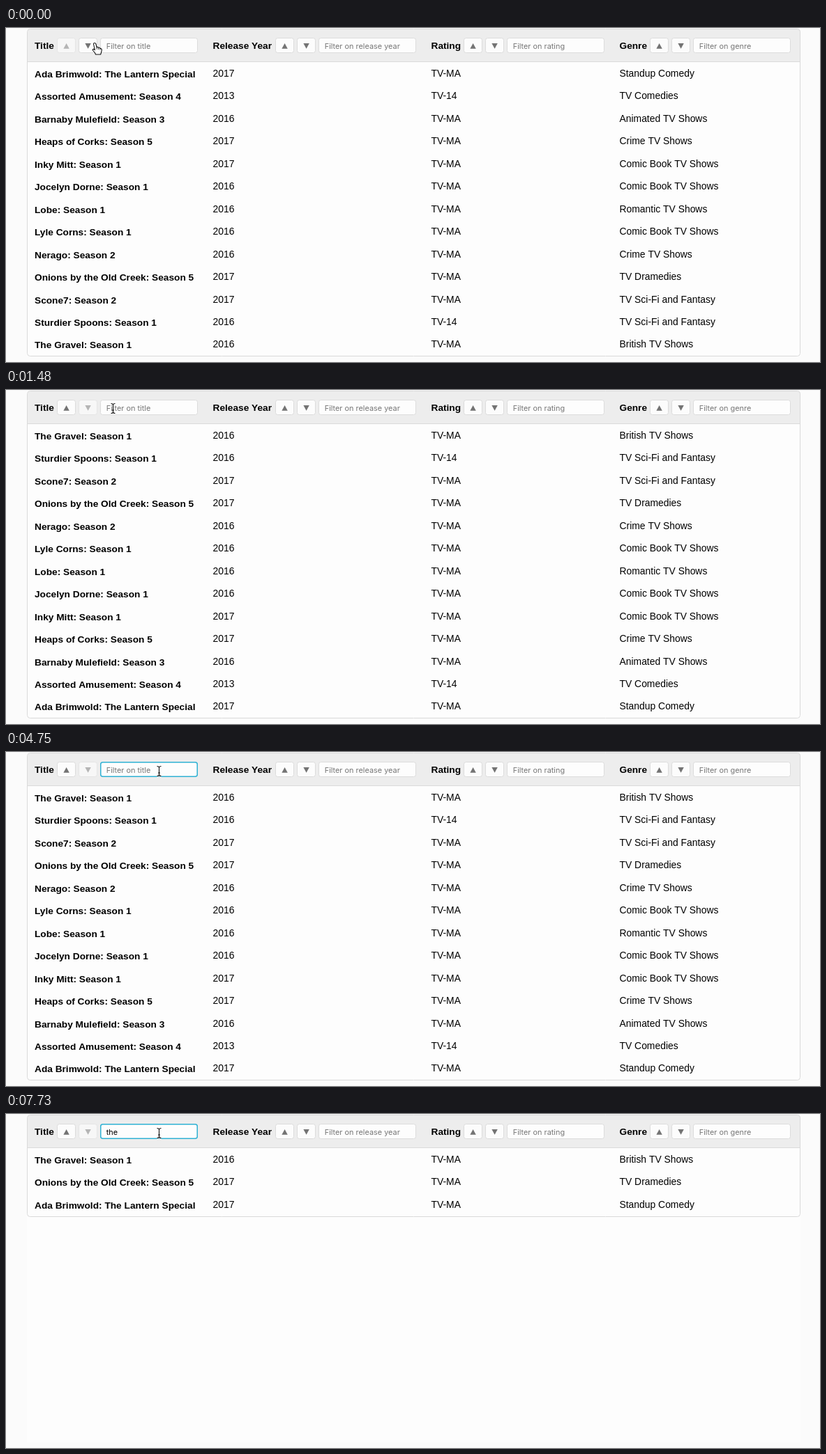
Write an HTML page with a canvas that moves like this. It is 1167 by 480 pixels and loops after 8 s.

```html
<!DOCTYPE html>
<html lang="en">
<head>
<meta charset="utf-8">
<title>Sortable, filterable table</title>
<style>
  html, body { margin: 0; width: 100%; height: 100%; overflow: hidden; background: #fbfbfb; }
  canvas { display: block; }
</style>
</head>
<body>
<canvas id="stage" width="1167" height="480"></canvas>
<script>
const ctx = document.getElementById('stage').getContext('2d');
const LOOP = 8000;
const PITCH = 32.45;
const SANS = '"Liberation Sans", Arial, sans-serif';
const BODY = `13.9px ${SANS}`;
const BOLD = `bold 13.7px ${SANS}`;
const FIELD = '10.9px Inter, Roboto, sans-serif';

const columns = [
  { label: 'Title', hint: 'Filter on title', x: 41, tools: 73 },
  { label: 'Release Year', hint: 'Filter on release year', x: 296.5, tools: 386 },
  { label: 'Rating', hint: 'Filter on rating', x: 609.5, tools: 656 },
  { label: 'Genre', hint: 'Filter on genre', x: 879.5, tools: 923 }
];

const shows = [
  ['Ada Brimwold: The Lantern Special', 2017, 'TV-MA', 'Standup Comedy'],
  ['Assorted Amusement: Season 4', 2013, 'TV-14', 'TV Comedies'],
  ['Barnaby Mulefield: Season 3', 2016, 'TV-MA', 'Animated TV Shows'],
  ['Heaps of Corks: Season 5', 2017, 'TV-MA', 'Crime TV Shows'],
  ['Inky Mitt: Season 1', 2017, 'TV-MA', 'Comic Book TV Shows'],
  ['Jocelyn Dorne: Season 1', 2016, 'TV-MA', 'Comic Book TV Shows'],
  ['Lobe: Season 1', 2016, 'TV-MA', 'Romantic TV Shows'],
  ['Lyle Corns: Season 1', 2016, 'TV-MA', 'Comic Book TV Shows'],
  ['Nerago: Season 2', 2016, 'TV-MA', 'Crime TV Shows'],
  ['Onions by the Old Creek: Season 5', 2017, 'TV-MA', 'TV Dramedies'],
  ['Scone7: Season 2', 2017, 'TV-MA', 'TV Sci-Fi and Fantasy'],
  ['Sturdier Spoons: Season 1', 2016, 'TV-14', 'TV Sci-Fi and Fantasy'],
  ['The Gravel: Season 1', 2016, 'TV-MA', 'British TV Shows']
];
const reversed = [...shows].reverse();

// Timelines: [start, value...]
const pointer = [
  [0, 'hand', 128, 22], [300, 'hand', 124, 23], [450, 'hand', 122, 23],
  [590, 'blocked', 122, 20], [1190, 'blocked', 123, 21], [1330, 'blocked', 122, 20.5],
  [1480, 'beam', 153.5, 26.5], [1620, 'beam', 154.5, 26.5],
  [2820, 'beam', 224.5, 27.5], [3110, 'beam', 219.5, 27.5]
];
const typed = [[0, ''], [5050, ' '], [5340, ''], [6990, 't'], [7130, 'the']];
const caret = [
  [0, false], [3260, true], [3700, false], [4150, true], [4750, false],
  [5050, true], [6090, false], [6540, true], [7730, false]
];
const at = (steps, t) => steps.findLast(s => s[0] <= t).slice(1);

function text(str, x, y, font, color = '#000') {
  ctx.font = font;
  ctx.fillStyle = color;
  ctx.fillText(str, x, y);
}

function box(x, y, w, h, r, fill, stroke, line = 1) {
  ctx.beginPath();
  ctx.roundRect(x + line / 2, y + line / 2, w - line, h - line, r);
  ctx.fillStyle = fill;
  ctx.fill();
  ctx.lineWidth = line;
  ctx.strokeStyle = stroke;
  ctx.stroke();
}

const buttonLooks = {
  normal: ['#fcfcfc', '#dcdcdc', '#737373'],
  waking: ['#fcfcfc', '#dcdcdc', '#929292'],
  disabled: ['#f7f7f7', '#e5e5e5', '#b5b5b5'],
  focus: ['#fcfcfc', '#4cb9d9', '#3f9fc4']
};

function sortButton(x, up, look) {
  const [fill, stroke, ink] = buttonLooks[look];
  box(x, 14, 27, 22, 3, fill, stroke);
  const cx = x + 13.6, base = up ? 29.7 : 22, tip = up ? 22 : 29.7;
  ctx.beginPath();
  ctx.moveTo(cx - 4.2, base);
  ctx.lineTo(cx + 4.2, base);
  ctx.lineTo(cx, tip);
  ctx.fillStyle = ink;
  ctx.fill();
}

function filterField(x, hint, value, focused, caretOn) {
  box(x, 14, 140, 22, 3, '#fdfdfd', focused ? '#2fb1d3' : '#dcdcdc', focused ? 1.5 : 1);
  text(value || hint, x + 8.7, 29.7, FIELD, value ? '#000' : '#777');
  if (!caretOn) return;
  ctx.fillStyle = '#000';
  ctx.fillRect(Math.round(x + 8.7 + (value ? ctx.measureText(value).width : 0)), 19, 1, 12);
}

const handShape = new Path2D('M-2.5 1Q-2.5-.5-1-.5Q.5-.5 .9 1L2 5.5Q3.6 4.8 4.4 6.2Q6 5.6 6.8 7.2Q9 7 9.3 9.5L8.6 13L7.6 16H.5L-.6 13.5L-3.6 10Q-4 8.2-2.2 8.3L-.6 9.6Z');
const handCreases = new Path2D('M2 5.5V8.5M4.4 6.2V9M6.8 7.2V9.5');
const arrowShape = new Path2D('M0 0V14L3.2 11L5.3 16L7.7 15L5.5 10.3H10Z');
const beamShape = new Path2D('M-3-7Q0-7 0-5Q0-7 3-7M0-5V5M-3 7Q0 7 0 5Q0 7 3 7M-1.5 2.5H1.5');

function outline(shape, color, width) {
  ctx.strokeStyle = color;
  ctx.lineWidth = width;
  ctx.stroke(shape);
}

const pointers = {
  hand() {
    ctx.fillStyle = '#fff';
    ctx.fill(handShape);
    outline(handShape, '#111', 1.1);
    outline(handCreases, '#111', 0.8);
  },
  blocked() {
    outline(arrowShape, '#fff', 1.8);
    ctx.fillStyle = '#000';
    ctx.fill(arrowShape);
    const sign = new Path2D();
    sign.arc(10, 21.5, 7, 0, Math.PI * 2);
    sign.moveTo(5.2, 16.7);
    sign.lineTo(14.8, 26.3);
    outline(sign, '#f4f4f4', 4);
    outline(sign, '#a2a2a2', 2);
  },
  beam() {
    outline(beamShape, '#fff', 2.4);
    outline(beamShape, '#111', 1.1);
  }
};

function drawPointer(kind, x, y) {
  ctx.save();
  ctx.translate(x, y);
  ctx.lineJoin = 'round';
  pointers[kind]();
  ctx.restore();
}

function buttonStates(t) {
  if (t < 150) return ['disabled', 'normal'];
  if (t < 740) return ['disabled', 'focus'];
  return [t < 890 ? 'waking' : 'normal', 'disabled'];
}

function drawHeader(t, value) {
  ctx.beginPath();
  ctx.roundRect(31, 1.5, 1108, 47, [4, 4, 0, 0]);
  ctx.fillStyle = '#ededed';
  ctx.fill();
  ctx.fillStyle = '#dadada';
  ctx.fillRect(31, 48, 1108, 1);
  columns.forEach((col, i) => {
    const [up, down] = i ? ['normal', 'normal'] : buttonStates(t);
    text(col.label, col.x, 30, BOLD);
    sortButton(col.tools, true, up);
    sortButton(col.tools + 31, false, down);
    filterField(col.tools + 62, col.hint, i ? '' : value, !i && t >= 3260, !i && at(caret, t)[0]);
  });
}

function draw(t) {
  const [value] = at(typed, t);
  const rows = (t < 590 ? shows : reversed).filter(s => s[0].toLowerCase().includes(value));
  const height = Math.round(48.3 + rows.length * PITCH);

  ctx.fillStyle = '#fbfbfb';
  ctx.fillRect(0, 0, 1167, 480);
  ctx.fillStyle = '#fdfdfd';
  ctx.fillRect(30, 1, 1109, 471);
  drawHeader(t, value);
  ctx.beginPath();
  ctx.roundRect(30.5, 1.5, 1108, height, 4);
  ctx.lineWidth = 1;
  ctx.strokeStyle = '#dadada';
  ctx.stroke();

  rows.forEach((row, i) => {
    const y = Math.round(70 + i * PITCH);
    row.forEach((cell, c) => text(cell, columns[c].x, c ? y : y + 1, c ? BODY : BOLD));
  });
  drawPointer(...at(pointer, t));
}

const start = performance.now();
function tick() {
  draw((performance.now() - start) % LOOP);
  requestAnimationFrame(tick);
}
tick();
</script>
</body>
</html>
```
